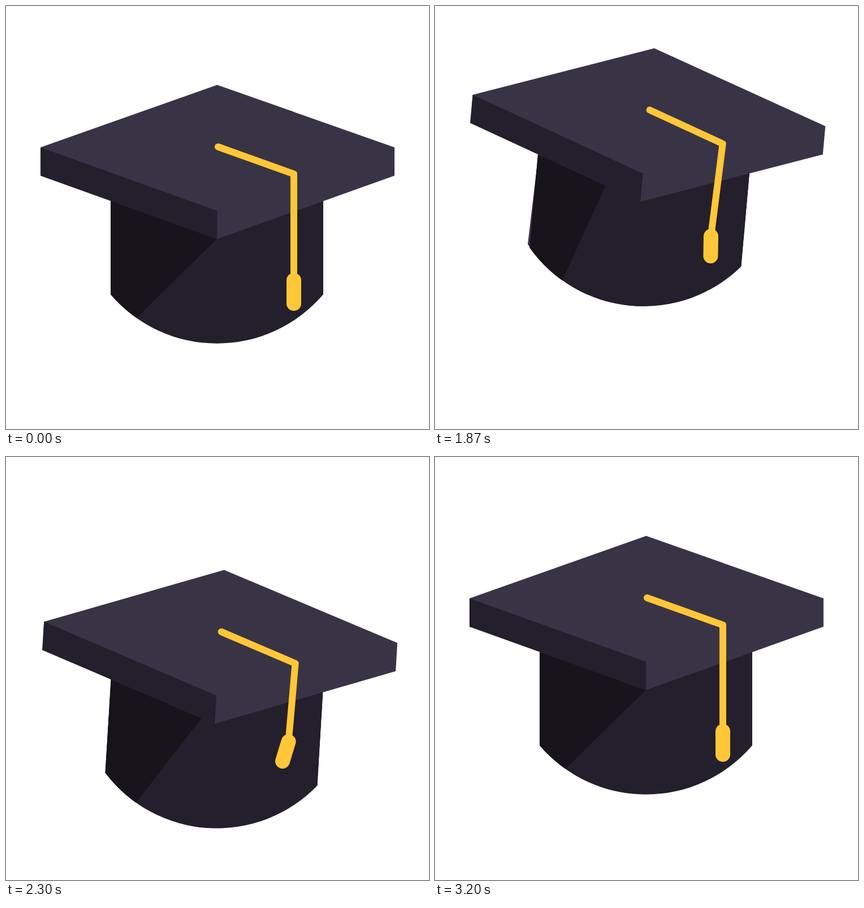
Recreate the animation shown at these times as an HTML page. Size 748 by 748 pixels, loop 3.22 s.

```html
<!DOCTYPE html>
<html lang="en">
<head>
<meta charset="utf-8">
<title>Graduation cap</title>
<style>
html, body { margin: 0; width: 100%; height: 100%; overflow: hidden; background: #fff; }
svg { display: block; width: 100%; height: 100%; }
.light { fill: #393445; }
.mid { fill: #241f2c; }
.dark { fill: #17141b; }
.gold { fill: none; stroke: #ffc738; stroke-linecap: round; stroke-linejoin: round; }
</style>
</head>
<body>
<svg viewBox="0 0 748 748">
  <defs>
    <clipPath id="body"><path d="M-189 60H187V260A247 247 0 0 1 -189 260Z"/></clipPath>
  </defs>
  <!-- Origin is the centre of the board -->
  <g id="cap">
    <path id="sliver" class="light"/>
    <g clip-path="url(#body)">
      <path class="mid" d="M-200 50H200V360H-200Z"/>
      <path id="shade" class="dark"/>
    </g>
    <path class="light" d="M-313 0L-.5 -110.5L313 0V50L-.8 162L-313 50Z"/>
    <path class="mid" d="M-313 0L-.8 112V162L-313 50Z"/>
    <path id="string" class="gold" stroke-width="12"/>
    <path id="tuft" class="gold" stroke-width="26"/>
  </g>
</svg>
<script>
const LOOP = 3220, START = 1520, STEP = 25;
const times = [1520, 1670, 1695, 1870, 2045, 2170, 2320, 2445, 2570, 2720, 2920, 3195];

// One value per time; a shorter track holds its last value
const tracks = {
  x:      [374, 362, 364.5, 378.5, 392, 411.5, 374, 358.5, 374],
  y:      [275, 382.5, 376.5, 184.8, 135.5, 190, 317.5, 279, 250],
  angle:  [-.23, -7.9, -6.9, 5.1, 13.5, 24, 0, -8.45, 0],
  ax:     [1, 12, 17.9, -6.2, -28, -41.8, 5, 41.8, 24, -24, 12, 0],
  ay:     [188, 187, 185.5, 164.7, 142, 127.1, 142, 165.2, 182, 185, 188, 188],
  bx:     [1, 24, 34.4, -3.6, -38, -62.4, 0, 57.9, 38, -34, 16, 0],
  by:     [229, 226, 223.8, 199.6, 174, 159.3, 178, 203, 222, 225, 229, 229],
  top:    [-1, 10, 16, -64.4, -60, -48.7, -20, -2.1, -1],
  bottom: [-135, -35, -20, -126, -130, -133, -131, -130, -143],
  bulge:  [0, 7, 8.6, 3.6, 0]
};
const rest = Object.fromEntries(Object.entries(tracks).map(([k, v]) => [k, v[v.length - 1]]));

// Zero slope at turning points, harmonic mean of the neighbours elsewhere
function slope(v, i) {
  if (i < 1 || i >= v.length - 1) return i ? 0 : (v[1] - v[0]) / (times[1] - times[0]);
  const a = (v[i] - v[i - 1]) / (times[i] - times[i - 1]);
  const b = (v[i + 1] - v[i]) / (times[i + 1] - times[i]);
  return a * b > 0 ? 2 * a * b / (a + b) : 0;
}

function sample(v, t) {
  const i = times.findLastIndex(k => k <= t);
  if (i >= v.length - 1) return v[v.length - 1];
  const d = times[i + 1] - times[i], u = (t - times[i]) / d, w = 1 - u;
  return v[i] * w * w * (1 + 2 * u) + v[i + 1] * u * u * (3 - 2 * u)
    + d * u * w * (slope(v, i) * w - slope(v, i + 1) * u);
}

function poseAt(t) {
  if (t < START) return rest;
  const tick = Math.floor((Math.floor(t / 10) * 10 - START) / STEP);
  const time = START + tick * STEP;
  return Object.fromEntries(Object.entries(tracks).map(([k, v]) => [k, sample(v, time)]));
}

const set = (id, name, value) => document.getElementById(id).setAttribute(name, value);
const brim = x => 162 - Math.abs(x) * .358;
const rim = x => 100 + Math.sqrt(247 * 247 - x * x);
const knot = { x: 135, y: 47 };

function draw(t) {
  const p = poseAt(t);
  const ax = knot.x + p.ax, ay = knot.y + p.ay;
  set("cap", "transform", `translate(${p.x} ${p.y}) rotate(${p.angle})`);
  set("sliver", "d", `M-188 95L${-189 - p.bulge} ${260 - 1.5 * p.bulge}L-188 260Z`);
  set("shade", "d", `M-250 0H${p.top}V${brim(p.top)}L${p.bottom} ${rim(p.bottom)}V400H-250Z`);
  set("string", "d", `M1 -1L${knot.x} ${knot.y}L${ax} ${ay}`);
  set("tuft", "d", `M${ax} ${ay}L${knot.x + p.bx} ${knot.y + p.by}`);
}

const begin = performance.now();
function frame() {
  draw((performance.now() - begin) % LOOP);
  requestAnimationFrame(frame);
}
frame();
</script>
</body>
</html>
```
